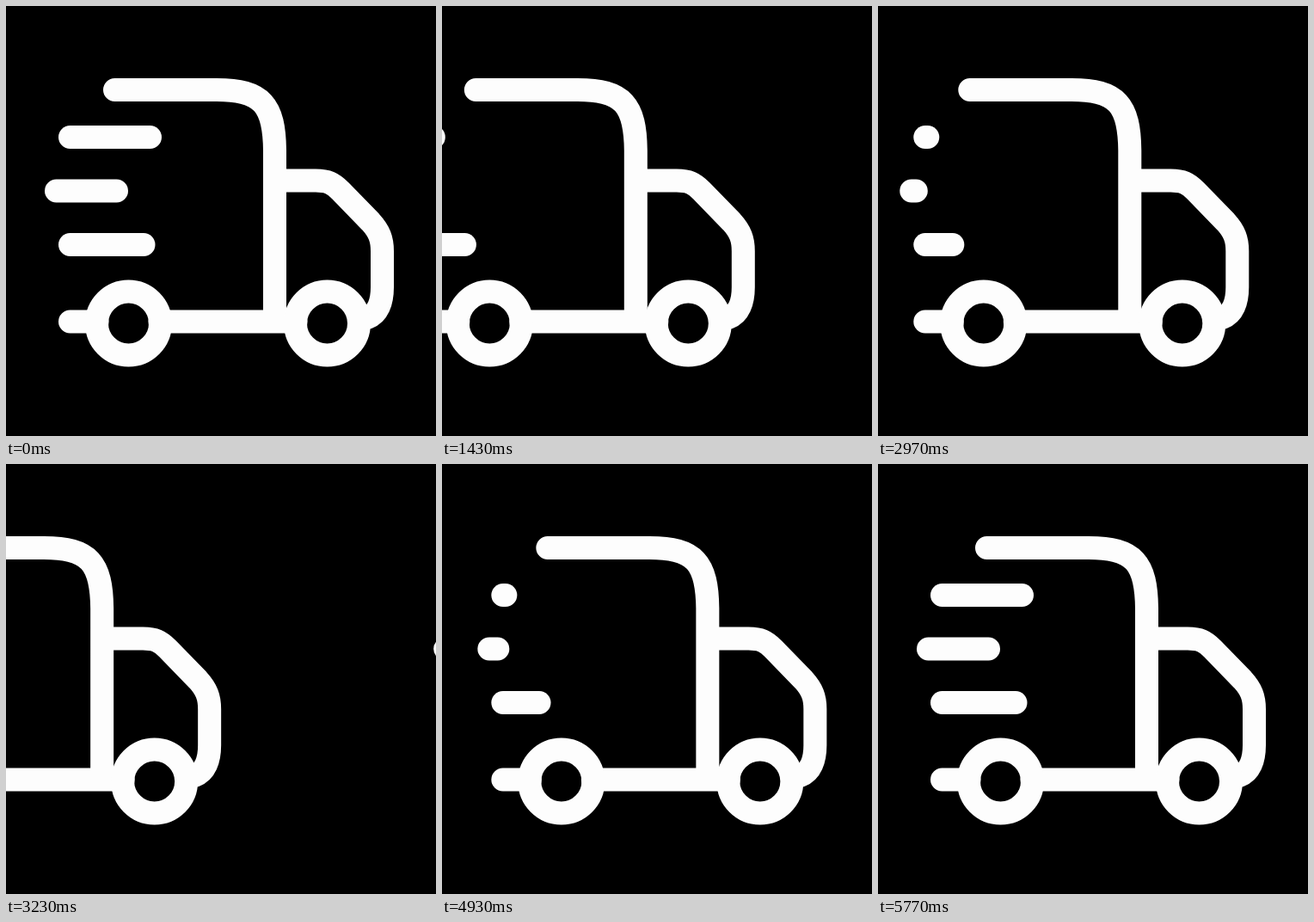
An HTML page with a canvas that plays this animation: 500 by 500 pixels, repeating every 5.81 s.

```html
<!DOCTYPE html>
<html lang="en">
<head>
<meta charset="utf-8">
<title>Delivery truck</title>
<style>
  html, body { margin: 0; width: 100%; height: 100%; overflow: hidden; background: #000; }
  canvas { display: block; width: 500px; height: 500px; }
</style>
</head>
<body>
<canvas id="stage" width="500" height="500"></canvas>
<script>
const ctx = document.getElementById('stage').getContext('2d');

const LOOP = 5810;       // ms
const FPS = 30;
const FRAMES = 174;
const CYCLE = 58;        // frames per drive
const FIRST_START = 8;   // frame on which the first drive begins
const DRIVE_END = 49;
const BACK_START = 2, BACK_END = 18.4, BACK_DISTANCE = 44;
const WRAP = 653;        // distance between the leaving and the arriving truck
const BAR_TIME = 12, BAR_MIN = 3;

// Speed lines: x and y of the left end, length, start frames of each change
const bars = [
  { x: 74.5, y: 152.5, length: 93,   shrink: 7.3,  regrow: 25,   arrive: 36.3 },
  { x: 58.5, y: 215,   length: 70,   shrink: 4.15, regrow: 21.6, arrive: 32.9 },
  { x: 74.5, y: 277.5, length: 85.5, shrink: 0.2,  regrow: 18.2, arrive: 29.5 }
];

const body = new Path2D(
  'M126.5 97.5 H245 C298 97.5 312 115 312.5 168 V367 ' +
  'M313 203 H360 C374 203 380 206 389 215 L424 251 ' +
  'C434 262 437.5 271 437.5 285 V327 C437.5 345 432 358 421 362 ' +
  'M74.5 367 H106 M179 367 H337');
const wheels = [142.5, 373.5];

const clamp01 = v => Math.min(1, Math.max(0, v));
const smooth = u => u * u * (3 - 2 * u);
const progress = (p, start, span) => smooth(clamp01((p - start) / span));

// Ease with bezier handles (x1, 0) and (x2, 1), solved by bisection
function ease(x, x1, x2) {
  x = clamp01(x);
  let low = 0, high = 1;
  for (let i = 0; i < 30; i++) {
    const u = (low + high) / 2, v = 1 - u;
    if (3 * x1 * u * v * v + 3 * x2 * u * u * v + u * u * u < x) low = u;
    else high = u;
  }
  return smooth(low);
}

function truckShift(p) {
  if (p < BACK_END) {
    return -BACK_DISTANCE * ease((p - BACK_START) / (BACK_END - BACK_START), 0.71, 0.6);
  }
  const run = ease((p - BACK_END) / (DRIVE_END - BACK_END), 0.56, 0.015);
  return -BACK_DISTANCE + (WRAP + BACK_DISTANCE) * run;
}

function drawTruck(shift, barAmount) {
  ctx.save();
  ctx.translate(shift, 0);
  ctx.stroke(body);
  for (const x of wheels) {
    ctx.beginPath();
    ctx.arc(x, 369, 37, 0, Math.PI * 2);
    ctx.stroke();
  }
  for (const bar of bars) {
    const length = BAR_MIN + (bar.length - BAR_MIN) * barAmount(bar);
    ctx.beginPath();
    ctx.moveTo(bar.x, bar.y);
    ctx.lineTo(bar.x + length, bar.y);
    ctx.stroke();
  }
  ctx.restore();
}

function frameAt(ms) {
  const n = Math.min(FRAMES - 1, Math.floor((ms + 5) * FPS / 1000));
  // The first drive skips every third frame
  return n < CYCLE && n % 3 === 2 ? n - 1 : n;
}

function draw(ms) {
  const p = (frameAt(ms) - FIRST_START + CYCLE) % CYCLE;
  ctx.fillStyle = '#000';
  ctx.fillRect(0, 0, 500, 500);
  ctx.strokeStyle = '#fdfdfd';
  ctx.lineWidth = 27;
  ctx.lineCap = 'round';
  ctx.lineJoin = 'round';

  const shift = truckShift(p);
  drawTruck(shift, bar =>
    1 - progress(p, bar.shrink, BAR_TIME) + progress(p, bar.regrow, BAR_TIME));
  if (p > BACK_END) {
    drawTruck(shift - WRAP, bar => progress(p, bar.arrive, BAR_TIME));
  }
}

const began = performance.now();
function tick() {
  draw((performance.now() - began) % LOOP);
  requestAnimationFrame(tick);
}
tick();
</script>
</body>
</html>
```
